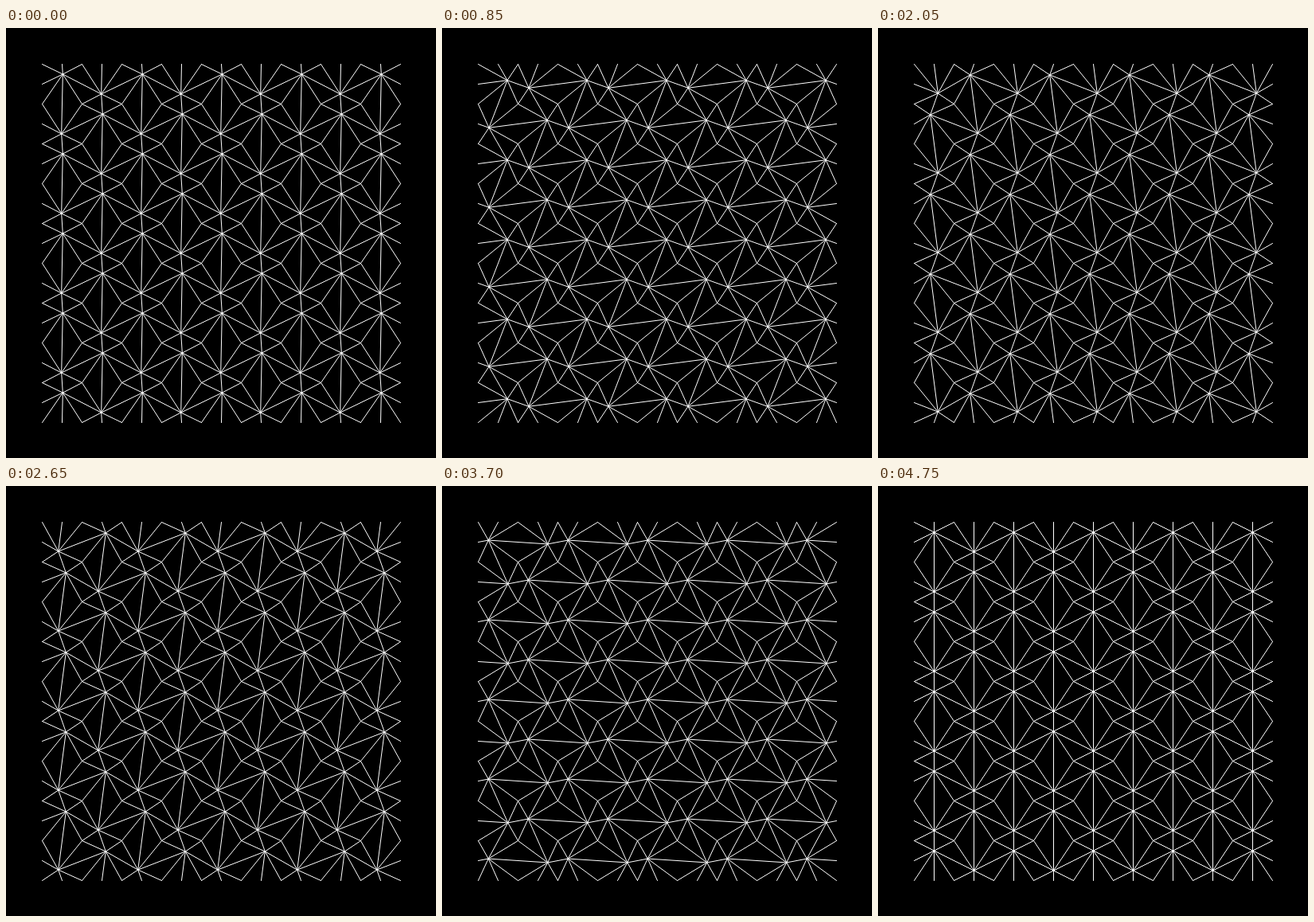
An HTML page with a canvas that plays this animation: 540x540 px, repeating every 4.8 s.

```html
<!DOCTYPE html>
<html lang="en">
<head>
<meta charset="utf-8">
<title>Turning hubs</title>
<style>
  html, body { margin: 0; width: 100%; height: 100%; overflow: hidden; background: #000; }
  canvas { display: block; width: 540px; height: 540px; }
</style>
</head>
<body>
<canvas id="stage" width="540" height="540"></canvas>
<script>
const LOOP = 4800, STEP = 50, STEPS = LOOP / STEP;
const CELLS = 9, HALF = 25, RADIUS = 12.5;
const ORIGIN = 45.5; // half-pixel offset keeps straight lines crisp

const ctx = document.getElementById('stage').getContext('2d');
ctx.strokeStyle = '#fff';
ctx.lineWidth = 1;
ctx.lineCap = 'round';

function line(x1, y1, x2, y2) {
  ctx.beginPath();
  ctx.moveTo(x1, y1);
  ctx.lineTo(x2, y2);
  ctx.stroke();
}

// Join a hub to the corners and edge midpoints of its cell.
function drawCell(cx, cy, hx, hy) {
  for (let v = -1; v <= 1; v++) {
    for (let u = -1; u <= 1; u++) {
      if (u || v) line(hx, hy, cx + u * HALF, cy + v * HALF);
    }
  }
}

function draw(time) {
  const step = Math.floor((time % LOOP) / STEP);
  const angle = (step + 1) / STEPS * Math.PI * 2;
  const dx = RADIUS * Math.sin(angle);
  const dy = -RADIUS * Math.cos(angle);

  ctx.fillStyle = '#000';
  ctx.fillRect(0, 0, 540, 540);
  for (let row = 0; row < CELLS; row++) {
    for (let col = 0; col < CELLS; col++) {
      const side = (row + col) % 2 ? -1 : 1;
      const cx = ORIGIN + HALF * (2 * col + 1);
      const cy = ORIGIN + HALF * (2 * row + 1);
      drawCell(cx, cy, cx + side * dx, cy + side * dy);
    }
  }
}

const start = performance.now();
function tick() {
  draw(performance.now() - start);
  requestAnimationFrame(tick);
}
tick();
</script>
</body>
</html>
```
